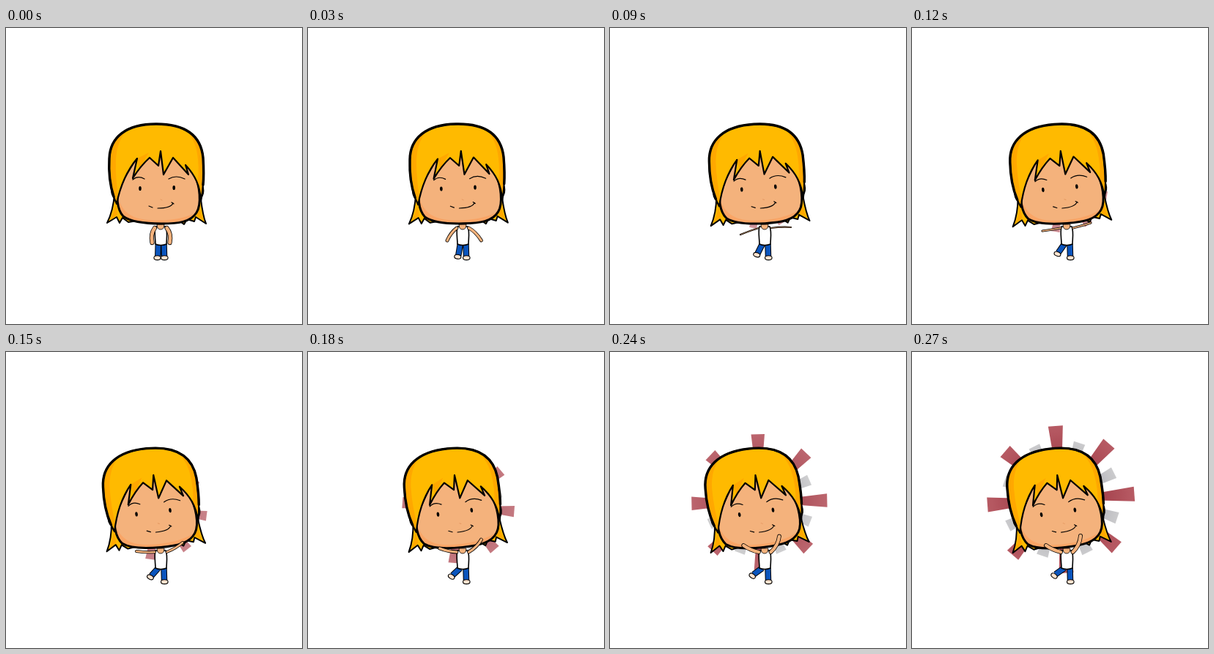
Animation, 404 px wide and 404 px high, one loop 0.3 s. Source, as an HTML page:

```html
<!DOCTYPE html>
<html lang="en">
<head>
<meta charset="utf-8">
<title>Cheering character</title>
<style>
  html, body { margin: 0; width: 100%; height: 100%; overflow: hidden; background: #fff; }
  svg { display: block; width: 100vw; height: 100vh; }
  .ink { fill: none; stroke: #000; stroke-linecap: round; stroke-linejoin: round; }
  .skin { fill: #f4b27c; }
  .hair { fill: #ffba00; }
  .shade { fill: #ffa800; }
</style>
</head>
<body>
<svg viewBox="0 0 404 404">
  <defs>
    <radialGradient id="red" gradientUnits="userSpaceOnUse" cx="0" cy="0" r="101">
      <stop offset=".55" stop-color="#9c2f3b"/>
      <stop offset="1" stop-color="#b04a54"/>
    </radialGradient>
    <radialGradient id="grey" gradientUnits="userSpaceOnUse" cx="0" cy="0" r="81">
      <stop offset=".7" stop-color="#b2b2b8"/>
      <stop offset="1" stop-color="#c6c6c8"/>
    </radialGradient>
    <path id="faceShape" d="M155 215C150 228 151 247 160 257C172 266 195 267 212 267C235 267 252 265 260 252C267 241 265 215 257 200L240 165H185Z"/>
    <path id="hairTop" d="M151 240C143 223 140 200 141 178C142 149 164 131 205 131C246 131 266 147 269 177C270 200 269 222 266 236C265 215 258 201 245 187L249 200L228 177L215 200L211 168L208 188L196 177C187 185 180 194 173 205L179 178C164 196 155 220 151 240Z"/>
    <clipPath id="faceClip"><use href="#faceShape"/></clipPath>
    <clipPath id="hairClip"><use href="#hairTop"/></clipPath>
  </defs>

  <g id="rays"></g>

  <g id="body">
    <path id="legOutline" class="ink" stroke-width="8.5" style="stroke-linecap:butt"/>
    <path id="jeans" class="ink" stroke-width="6.5" style="stroke:#0b55bd;stroke-linecap:butt"/>
    <g fill="#ffe3cf" stroke="#000" stroke-width="1.1">
      <ellipse id="leftShoe" rx="4.6" ry="2.9"/>
      <ellipse id="rightShoe" cx="216.3" cy="313.7" rx="4.8" ry="2.9"/>
    </g>
    <path d="M204 271L218 271C221 278 219 288 219 295Q211 298 204 295C204 288 202 278 204 271Z" fill="#fff" stroke="#000" stroke-width="1.6"/>
    <path class="skin" d="M206 268Q206 275 211 275Q216 275 216 268Z" stroke="#000" stroke-width=".8"/>
  </g>

  <g id="head">
    <path class="hair" stroke="#000" stroke-width="2" stroke-linejoin="round" d="M148 226C147 242 143 256 138 266L151 258L155 266L159 259L167 265L185 262H235L243 268L247 261L257 264L259 258L273 267C268 255 267 242 265 226Z"/>
    <path class="shade" d="M150 238Q147 254 142 262L152 255ZM265 238Q264 250 269 262L260 256Z"/>
    <g class="skin" stroke="#000" stroke-width="1.8">
      <ellipse cx="150" cy="222" rx="6" ry="10"/>
      <ellipse cx="264" cy="222" rx="5.5" ry="10"/>
    </g>
    <use href="#faceShape" class="skin"/>
    <path clip-path="url(#faceClip)" fill="#ff9c54" opacity=".55" d="M150 215C153 246 166 260 195 262Q235 265 264 250V270H150Z"/>
    <use href="#faceShape" class="ink" stroke-width="3"/>
    <use href="#hairTop" class="hair"/>
    <path clip-path="url(#hairClip)" class="shade" d="M140 230V165Q148 142 170 134Q151 152 150 180Q149 205 154 235ZM270 230V165Q264 146 242 135Q260 152 262 180Q264 200 260 215ZM179 178Q187 174 195 170L182 192Z"/>
    <use href="#hairTop" class="ink" stroke-width="2.2"/>
    <path class="ink" stroke-width="3.4" d="M147 230C141 212 140 195 141 178C142 149 164 131 205 131C246 131 266 147 269 177C270 194 270 204 269 214"/>
    <path class="ink" stroke-width="1.2" d="M173 207Q180 201 189 206M222 206Q232 200 244 206M195 243L200 245M207 246Q225 246 228 239M226 238L229 240"/>
    <path class="ink" stroke-width="1" style="stroke:#e59a63" d="M211 234L213 235"/>
    <ellipse cx="183" cy="219" rx="1.8" ry="3.1"/>
    <ellipse cx="229.2" cy="218" rx="1.8" ry="3.1"/>
  </g>

  <g id="arms"></g>
</svg>
<script>
const STEP = 30, LAST = 9;
const $ = id => document.getElementById(id);
const set = (node, attrs) => {
  for (const key in attrs) node.setAttribute(key, attrs[key]);
  return node;
};
const add = (parent, tag, attrs) =>
  set(parent.appendChild(document.createElementNS("http://www.w3.org/2000/svg", tag)), attrs);

// Sixteen wedges: long red ones alternate with short grey ones.
for (let i = 0; i < 16; i++) {
  const red = i % 2 === 0, r = red ? 100.5 : 81, w = r / 10;
  add($("rays"), "path", {
    d: `M0 0L${r} ${-w}V${w}Z`,
    fill: `url(#${red ? "red" : "grey"})`,
    transform: `rotate(${i * 22.5})`
  });
}

// Arm poses: step, hand x, hand y, elbow x, elbow y, thickness
const armPoses = [
  [[0, 199.5, 293, 197, 281, 4.6], [1, 190, 290, 195, 279, 3.2], [3, 178, 282, 193, 276, .6],
   [5, 178, 272, 192, 274, 2.4], [7, 181.5, 264, 191, 271, 4], [9, 183, 264, 191, 270, 4.3]],
  [[0, 223.5, 293, 226, 281, 4.6], [1, 236.5, 290, 229, 278, 3.2], [3, 247, 272, 235, 271, .6],
   [5, 241, 260, 232, 268, 2.4], [7, 232, 252, 230, 264, 4], [9, 230, 251, 229, 264, 4.3]]
];
const shoulders = ["203 273", "219.5 273"];
const arms = shoulders.map(() => ["#000", "#f4b27c"].map(stroke =>
  add($("arms"), "path", { class: "ink", style: `stroke:${stroke}` })));

function poseAt(poses, step) {
  const next = Math.max(1, poses.findIndex(p => p[0] >= step));
  const a = poses[next - 1], b = poses[next];
  const k = (step - a[0]) / (b[0] - a[0]);
  return a.map((v, i) => v + (b[i] - v) * k);
}

function draw(step) {
  const left = LAST - step;
  const ease = Math.sin(step / LAST * Math.PI / 2);

  set($("rays"), {
    transform: `translate(${203.2 + .65 * left} ${201.2 + 3.45 * left}) rotate(${-4.2 + 2.9 * left}) scale(${1 - .0796 * left})`,
    opacity: .9 - .055 * left
  });
  set($("head"), { transform: `translate(${-.8 * ease} 0) rotate(${-6.9 * ease} 206 267)` });

  const footX = 206.5 - 12.5 * ease, footY = 313.7 - 8.2 * ease;
  const legs = `M207.8 295L${footX + .8 + ease} ${footY - 2}M215.5 295L216 311.5`;
  set($("legOutline"), { d: legs });
  set($("jeans"), { d: legs });
  set($("leftShoe"), { cx: footX, cy: footY, transform: `rotate(${35 * ease} ${footX} ${footY})` });

  arms.forEach(([outline, fill], i) => {
    const [, x, y, ex, ey, width] = poseAt(armPoses[i], step);
    const d = `M${shoulders[i]}Q${ex} ${ey} ${x} ${y}`;
    set(outline, { d, "stroke-width": width + 1.6 });
    set(fill, { d, "stroke-width": width });
  });
}

const start = performance.now();
function tick() {
  const elapsed = performance.now() - start;
  draw(Math.floor(elapsed / STEP) % (LAST + 1));
  requestAnimationFrame(tick);
}
tick();
</script>
</body>
</html>
```
